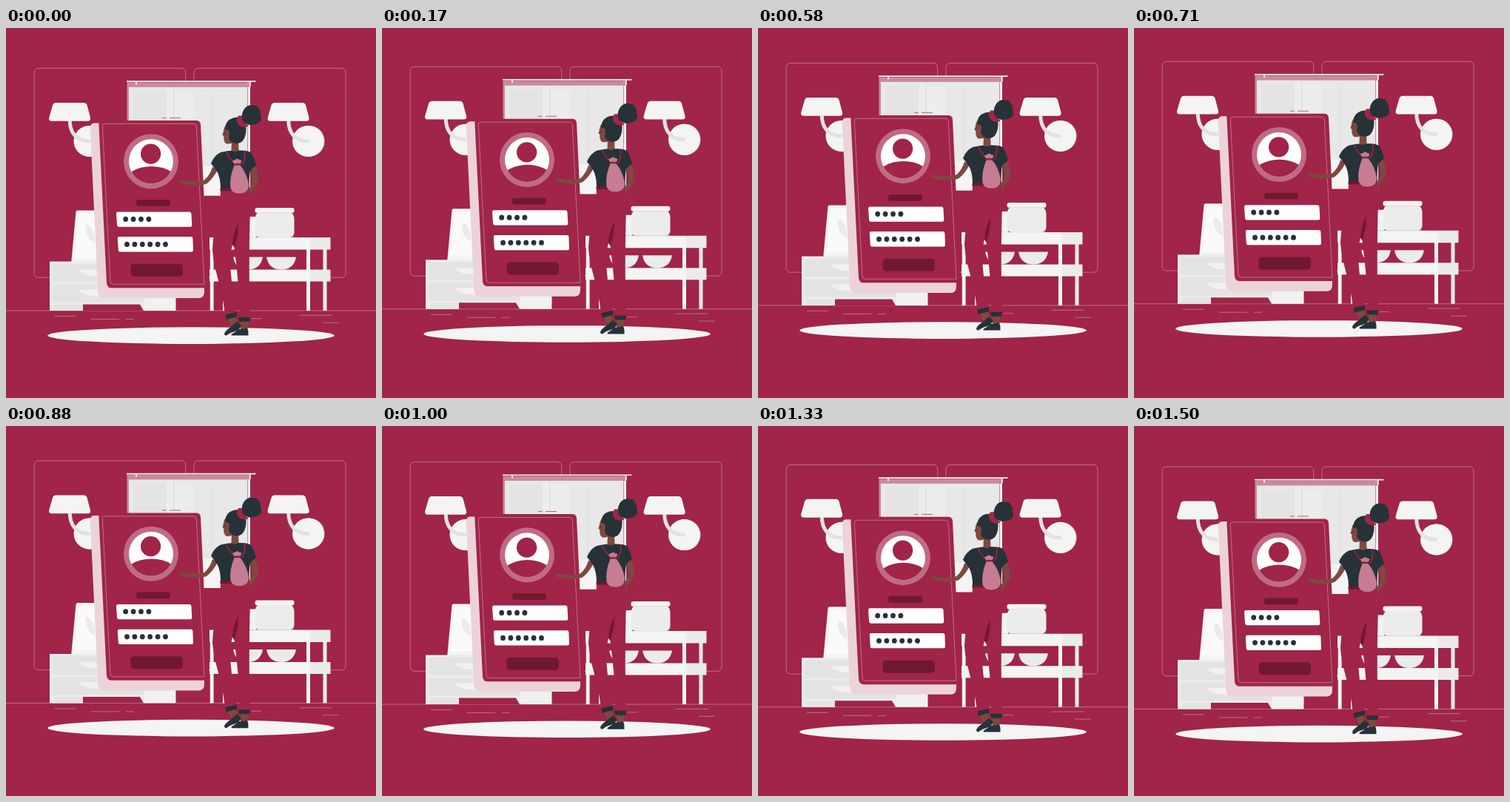
An HTML page for the animation above (1.54 s loop, 500x500 px).

```html
<!DOCTYPE html>
<html lang="en">
<head>
<meta charset="utf-8">
<title>Login scene</title>
<style>
  html, body { margin: 0; width: 100%; height: 100%; overflow: hidden; background: #a02548; }
  svg { display: block; width: 100vw; height: 100vh; }
  .main { fill: #a02548; }
  .deep { fill: #711831; }
  .ink { fill: #263238; }
  .skin { fill: #7f4840; }
  .w1 { fill: #f4f4f4; }
  .w2 { fill: #ebebeb; }
  .w3 { fill: #e3e3e3; }
  .line { fill: none; stroke: #ebebeb; stroke-width: .5; stroke-opacity: .75; }
</style>
</head>
<body>
<svg viewBox="0 0 500 500">
  <defs>
    <clipPath id="disc"><circle cx="196" cy="180.8" r="30"/></clipPath>
    <g id="lamp">
      <circle cx="114" cy="153.5" r="21" class="w3"/>
      <circle cx="112.5" cy="153.5" r="21" class="w1"/>
      <path d="M86.2 124C86 143 96 153.5 112 153.5" fill="none" stroke="#e2e2e2" stroke-width="5" stroke-linecap="round"/>
      <path class="w1" d="M67.5 101.5H105Q108.7 101.500 109.600 105L114 121.500Q115 126.300 110.500 126.300H61.700Q57.200 126.300 58.200 121.500L63 105Q64 101.500 67.500 101.500Z"/>
    </g>
  </defs>

  <g id="scene">
    <g class="line">
      <rect x="38.200" y="55" width="204.500" height="282.800" rx="5.700"/>
      <rect x="254" y="55" width="205" height="282.800" rx="5.700"/>
      <path d="M0 382.500H500M66 390H94.500M114.500 394H153M162 394H173M331 393.300H345M396.500 388.800H441M428 398.800H450"/>
    </g>

    <g id="closet">
      <rect x="163.500" y="74" width="163" height="60" fill="#c78a9e"/>
      <rect x="166" y="80.500" width="164" height="146.500" fill="#e8e8e8"/>
      <rect x="173" y="86" width="44" height="60" fill="#e4e4e4"/>
      <path d="M217 86L226 80.500V146H217ZM228 86H253V146H228Z" fill="#ededed"/>
      <path d="M226.500 81V146M278.300 87V215" stroke="#dcdcdc" stroke-width=".8"/>
      <path d="M264 187H330V227H264Z" class="w1"/>
      <path d="M326 73.500H330V227H326Z" fill="#c78a9e"/>
      <path d="M327 80.500H330V227H327Z" fill="#f4f4f4"/>
      <path d="M211 122H217M221 122H236" stroke="#a8647a"/>
      <path d="M163 72.700H337.500" stroke="#eee" stroke-width="1.700"/>
      <path d="M176 73V77M329.800 73V80" stroke="#f4f4f4" stroke-width="1.800"/>
    </g>

    <use href="#lamp"/>
    <use href="#lamp" x="295.500"/>

    <g id="cabinet">
      <path class="w1" d="M96.500 247H124L126 317H88.200L94.500 249Q94.800 247 96.500 247Z"/>
      <path fill="#fafafa" d="M98 251H124V311H92Z"/>
      <path class="w2" d="M108 266Q120 267 120 291Q106 284 108 266Z"/>
      <path class="w2" d="M59 316H188V382.500H59Z"/>
      <path fill="#f1f1f1" d="M187 316H229.500V382.500H187Z"/>
      <path class="w3" d="M63 319.500H187V343.500H63ZM63 347H187V371H63ZM66 374H104V382.500H64Z"/>
      <path fill="#f1f1f1" d="M98 327H127V336Q103 336 98 327ZM98 354H127V363Q103 363 98 354Z"/>
      <path class="main" d="M104 374H181L186 382.500H104Z"/>
    </g>

    <g id="table">
      <path class="w2" d="M428.500 299H433.500V382.500H428.500Z"/>
      <path class="w1" d="M275.800 299H280.600V382.500H275.800ZM293 343H298V382.500H293ZM406 299H411V382.500H406Z"/>
      <path class="w2" d="M352 310H392Q389 327 372 327Q355 327 352 310ZM307 310H347Q344 327 327 327Q310 327 307 310Z"/>
      <path class="w1" d="M275 283.500H411V300H275ZM275 327H411V343H275Z"/>
      <path class="w2" d="M411 283.500H438.500V300H411ZM411 327H438.500V343H411Z"/>
      <path class="w1" d="M322 255.500H338V283.500H322Z"/>
      <path fill="#ececec" d="M340 250H386Q389.500 254 389.500 259V277Q389 283 383 283.500H343Q336.500 283 336.500 277V259Q336.500 254 340 250Z"/>
      <rect class="w1" x="336.500" y="243.500" width="53" height="6.800" rx="2.800"/>
      <path d="M336 283.600H390" stroke="#ddd" stroke-width=".6"/>
    </g>

    <ellipse class="w1" cx="250" cy="416.200" rx="193.900" ry="11.300"/>

    <g id="phone">
      <path fill="#ecd3da" d="M119 129H140L150 340L268 348V357Q268 365.500 260 365.500H133Q125 365.500 124.300 357L113.800 136Q113.600 129 119 129Z"/>
      <path class="main" d="M131 125.500H257Q262.500 125.500 263 131L273 345Q273 351.800 266 351.800H143Q136.500 351.800 136 345L125.400 131Q125.400 125.500 131 125.500Z"/>
      <path class="line" stroke-width=".7" d="M133 130H253Q257 130 257.300 134L268 346.800H145Q141.300 346.800 141 343L130.300 133Q130.300 130 133 130Z"/>
      <circle cx="196" cy="180.800" r="37" fill="#c06a86"/>
      <circle cx="196" cy="180.800" r="30" fill="#fff"/>
      <g class="main" clip-path="url(#disc)">
        <circle cx="195.600" cy="170.700" r="13.600"/>
        <ellipse cx="196.500" cy="212.500" rx="38" ry="25"/>
      </g>
      <rect class="deep" x="176" y="232.500" width="46" height="8.800" rx="3.200"/>
      <path fill="#fff" d="M151 249H248Q250.300 249 250.500 251.500L251.300 267Q251.300 269.300 249 269.300H152.500Q150.300 269.300 150.100 267L149 251.500Q149 249 151 249ZM152.700 282.700H250Q252.200 282.700 252.400 285L253 300.800Q253 303 250.800 303H154Q152 303 151.800 300.800L150.800 285Q150.800 282.700 152.700 282.700Z"/>
      <g class="ink" id="dots"></g>
      <rect class="deep" x="168.500" y="319.300" width="70.500" height="17" rx="4.500"/>
    </g>

    <g id="woman">
      <path class="skin" d="M279 188Q276 199 268 206Q256 209 245 207L236 205.500Q232.500 208 236 210.500L246 212.500Q262 214 271 211Q280 204 286 192Z"/>
      <path class="skin" d="M331 188L337 187Q343 201 340 211Q336 218 331 223L330 231H327L326 220Q333 214 333 207Z"/>
      <path class="skin" d="M299 392.500L309 390.500L316 402L305 405ZM317 396H328L326 408H317Z"/>
      <path class="ink" d="M295 413.500Q296 410 303 405L312 397.500L318 402.500Q316 407 311 410Q303 412 298 416.200Q295 416.200 295 413.500Z"/>
      <path class="ink" d="M304.500 414.500Q311 411 314.500 407Q321 408 326 405.500Q328 410 327.500 416.200H306Q304 416.200 304.500 414.500Z"/>
      <path class="main" d="M290 217H328.500Q331 238 329.500 262Q328 320 329.500 391H316Q315 346 308.500 297L306 293Q301 312 304 333Q306 360 312 385L296 388Q293 362 286 338Q280 316 279 300Q280 275 286 256Q290 238 290 217Z"/>
      <path class="deep" d="M314 263.500Q306.500 280 306 293L308.500 297Q314 281 314 263.500Z"/>
      <path class="ink" d="M296.300 388L312 384.500L312.500 390.500L297.500 394.500ZM314 391.300H330L329 397.300H315Z"/>
      <path class="ink" d="M290 168.500Q303 165 318 166Q329 166 332 170Q336 177 338 186L330 193Q328 204 329 217.500L290 218Q290 203 285 194L277 183.500Q281 173 290 168.500Z"/>
      <path class="deep" d="M289.500 217H306V221H289.500Z"/>
      <path class="skin" d="M305 151H314L314.500 166Q309 169 304.500 166.300Z"/>
      <path d="M298 167.500Q300 177 311 184M322.500 166.500Q324 177 319 186" fill="none" stroke="#8f2444" stroke-width="2"/>
      <path fill="#c67c93" d="M308.500 186H316.500Q325 196 327.800 211Q329 222 318 224Q306 225 303.500 217Q301.500 203 308.500 186Z"/>
      <path fill="#c67c93" d="M306 180L309.500 178.500L312.500 177L315.500 178.800L318.500 179.500L316.500 185H308.500Z"/>
      <path d="M307.500 184.500H317" stroke="#8f2444" stroke-width="2"/>
      <path class="skin" d="M296 133Q293.500 138 293.500 142L292.300 145L294.300 146.500Q293.600 153 297 156.500Q302 158.500 309 154V133Z"/>
      <path class="ink" d="M296 136Q297 125 307 122Q318 119 324 130Q326 145 320 153Q314 158.500 307 155.500Q302 154 301 148Q303 140 300 138Q297 139 296 136Z"/>
      <path class="main" d="M314 119Q309 126 315 132Q321 136 328 133Q319 127 319 119Z"/>
      <path class="ink" d="M319 123Q317.500 114 324 107.500Q330 103 335 105.500Q341 105 341.500 110Q345.500 113 343.500 117Q347 123 343 128Q335 133 327 131Q320 129 319 123Z"/>
      <path d="M293.800 143.300L296.800 142.500" stroke="#263238"/>
      <path d="M329 131.500Q339 132.500 344.500 126" fill="none" stroke="#8f2444" stroke-width=".7"/>
    </g>
  </g>
</svg>
<script>
  const LOOP = 1540, STEPS = 37, LIFT = 10, LEAD = 45;
  const scene = document.getElementById('scene');

  const dots = (n, x, y) => Array.from({ length: n }, (_, i) =>
    `<ellipse cx="${x + i * 10.4}" cy="${y}" rx="3.400" ry="3.600"/>`).join('');
  document.getElementById('dots').innerHTML = dots(4, 161.7, 258.9) + dots(6, 163.5, 292.9);

  // Linear float up and back, held at 37 poses per loop
  function pose(now) {
    const step = Math.floor((now % LOOP) / LOOP * STEPS);
    const phase = (step / STEPS + LEAD / LOOP) % 1;
    return -LIFT * (1 - Math.abs(1 - 2 * phase));
  }

  let start;
  function draw(now) {
    start ??= now;
    scene.setAttribute('transform', `translate(0 ${pose(now - start).toFixed(3)})`);
    requestAnimationFrame(draw);
  }
  scene.setAttribute('transform', `translate(0 ${pose(0).toFixed(3)})`);
  requestAnimationFrame(draw);
</script>
</body>
</html>
```
